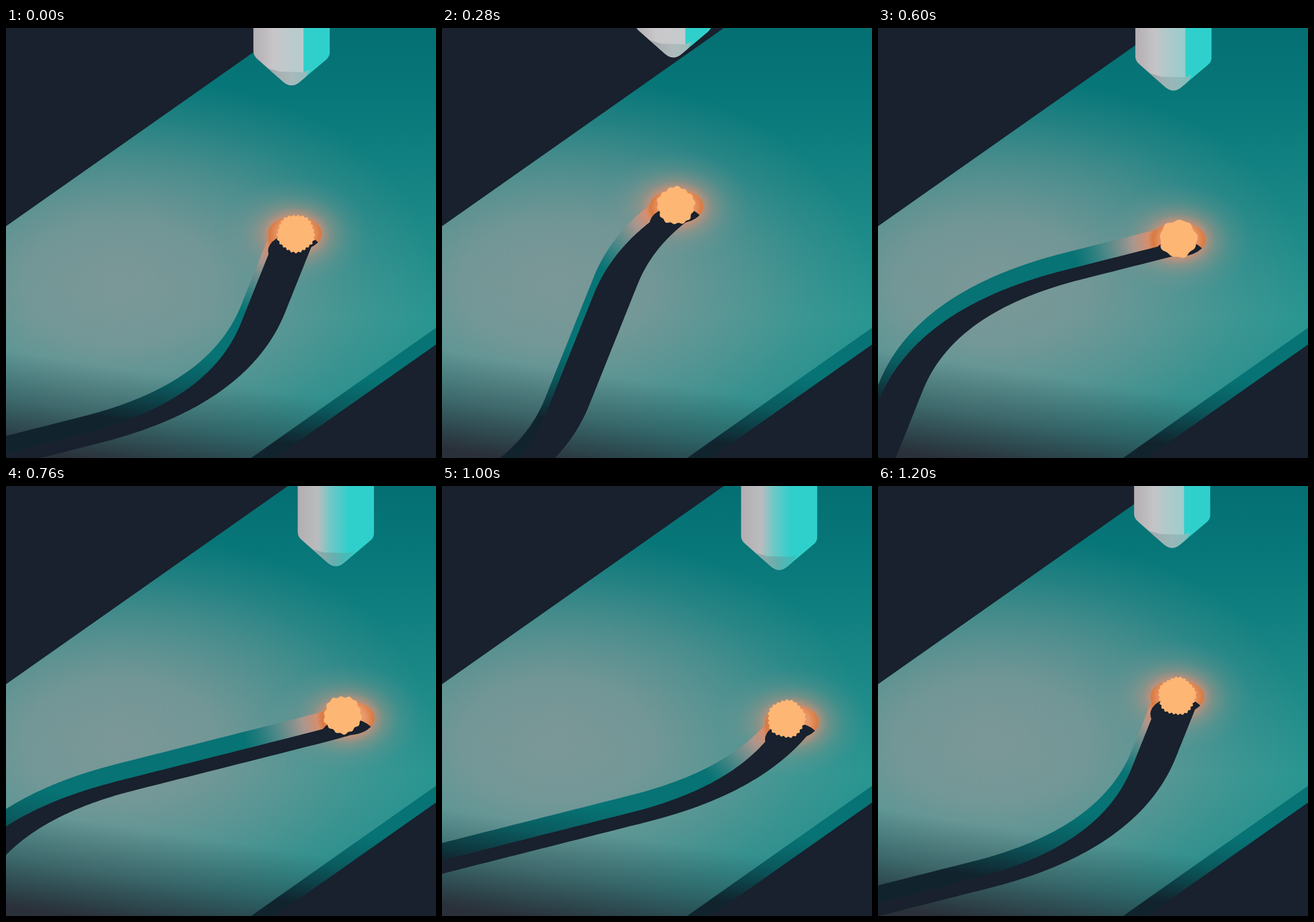
An HTML page with a canvas that plays this animation: 720x720 px, repeating every 1240 ms.

```html
<!DOCTYPE html>
<html lang="en">
<head>
<meta charset="utf-8">
<title>Laser cutter</title>
<style>
  html, body { margin: 0; width: 100%; height: 100%; overflow: hidden; background: #18212d; }
  canvas { display: block; width: 720px; height: 720px; }
</style>
</head>
<body>
<canvas id="stage" width="720" height="720"></canvas>
<script>
const SIZE = 720, LOOP = 1240, STEP = 40, DEPTH = 29, SQUASH = 0.63;
const DARK = '#18212d';
const BELT = { x: -0.789, y: 0.555 };
const ctx = document.getElementById('stage').getContext('2d');
const slotCanvas = document.createElement('canvas');
slotCanvas.width = slotCanvas.height = SIZE;
const slot = slotCanvas.getContext('2d');

// Back-and-forth at constant speed; each turn is a parabola lasting 2 * turn ms
function shuttle(t, center, speed, turn) {
  const half = LOOP / 2;
  const phase = (((t - 277) % LOOP) + LOOP) % LOOP;
  const rise = Math.min(phase, LOOP - phase);
  const fromTurn = Math.min(rise, half - rise);
  const eased = fromTurn < turn ? (turn + fromTurn * fromTurn / turn) / 2 : fromTurn;
  const reach = speed * (half / 2 - eased);
  return center + (rise < half / 2 ? -reach : reach);
}

const cutX = t => shuttle(t, 497, 0.472, 182);
const holeX = t => shuttle(t, 498, 0.43, 130);
const sparkX = t => shuttle(t, 498, 0.38, 60);
const nozzleX = t => shuttle(t, 490, 0.36, 50);
const railY = x => 102.5 + 0.5 * x;

function addStops(gradient, stops) {
  stops.forEach(([at, color]) => gradient.addColorStop(at, color));
  return gradient;
}

function linear(c, x0, y0, x1, y1, stops) {
  return addStops(c.createLinearGradient(x0, y0, x1, y1), stops);
}

function polygon(c, points, fill) {
  c.beginPath();
  points.forEach(([x, y]) => c.lineTo(x, y));
  c.closePath();
  c.fillStyle = fill;
  c.fill();
}

function glow(c, x, y, rx, ry, stops) {
  c.save();
  c.translate(x, y);
  c.scale(rx, ry);
  c.fillStyle = addStops(c.createRadialGradient(0, 0, 0, 0, 0, 1), stops);
  c.fillRect(-1, -1, 2, 2);
  c.restore();
}

const wallShade = c => linear(c, 0, 500, -18, 625,
  [[0, '#077374'], [0.45, '#0a5a5e'], [1, '#11242e']]);

function drawBelt() {
  ctx.fillStyle = DARK;
  ctx.fillRect(0, 0, SIZE, SIZE);
  polygon(ctx, [[720, 500], [408, 720], [450, 720], [720, 530]], wallShade(ctx));

  ctx.save();
  polygon(ctx, [[0, 332], [472, 0], [720, 0], [720, 502], [410, 720], [0, 720]],
    linear(ctx, 0, 0, 0, SIZE, [[0, '#046f72'], [0.17, '#08787a'], [0.67, '#2a9691'], [1, '#238b89']]));
  ctx.clip();
  glow(ctx, 190, 425, 530, 345, [[0, 'rgba(128,152,152,.95)'], [0.3, 'rgba(128,152,152,.85)'],
    [0.6, 'rgba(128,152,152,.48)'], [0.8, 'rgba(128,152,152,.2)'], [1, 'rgba(128,152,152,0)']]);
  ctx.fillStyle = linear(ctx, 100, 555, 76, 715,
    [[0, 'rgba(42,40,50,0)'], [0.5, 'rgba(42,40,50,.4)'], [1, 'rgba(42,40,50,.92)']]);
  ctx.fillRect(0, 0, SIZE, SIZE);
  ctx.restore();
}

// Past cuts carried away by the belt, plus the hole under the beam
function traceSlot(t, hole, color, drop) {
  slot.save();
  slot.translate(0, drop);
  slot.scale(1, SQUASH);
  slot.lineWidth = 76;
  slot.lineCap = slot.lineJoin = 'round';
  slot.strokeStyle = slot.fillStyle = color;
  slot.beginPath();
  for (let age = 0; age <= 1400; age += 10) {
    const x = cutX(t - age);
    slot.lineTo(x + BELT.x * age, (railY(x) + BELT.y * age) / SQUASH);
  }
  slot.stroke();
  slot.beginPath();
  slot.arc(hole.x, hole.y / SQUASH, 45, 0, 2 * Math.PI);
  slot.fill();
  slot.restore();
}

function drawSlot(t, hole) {
  slot.globalCompositeOperation = 'source-over';
  slot.clearRect(0, 0, SIZE, SIZE);
  traceSlot(t, hole, '#000', 0);
  slot.globalCompositeOperation = 'source-atop';
  slot.fillStyle = wallShade(slot);
  slot.fillRect(0, 0, SIZE, SIZE);
  glow(slot, hole.x, hole.y, 180, 150, [[0, '#f0a878'], [0.16, '#e8976a'], [0.24, '#d97a40'],
    [0.29, '#d58f70'], [0.43, 'rgba(176,152,144,.95)'], [0.7, 'rgba(122,150,150,.6)'], [1, 'rgba(80,140,140,0)']]);
  traceSlot(t, hole, DARK, DEPTH);
  ctx.drawImage(slotCanvas, 0, 0);
}

function drawSpark(t) {
  const cx = sparkX(t), cy = railY(cx) - 1;
  const teeth = Math.round(17 + 9 * Math.cos(2 * Math.PI * (t + 100) / LOOP));
  ctx.beginPath();
  for (let i = 0; i < 180; i++) {
    const a = i * Math.PI / 90;
    const r = 31 + 1.2 * Math.sin(teeth * a + t) + Math.sin(5 * a + t / 30);
    ctx.lineTo(cx + r * Math.cos(a), cy + r * Math.sin(a));
  }
  ctx.fillStyle = '#fdb674';
  ctx.fill();
}

function drawNozzle(t) {
  const x = nozzleX(t), y = 97 + 0.515 * (x - 480);
  const lit = Math.max(0, Math.min(1, (x - 470) / 85));
  const tint = (a, b) => `rgb(${a.map((v, i) => Math.round(v + (b[i] - v) * lit))})`;
  ctx.save();
  ctx.translate(x, y);
  ctx.beginPath();
  ctx.moveTo(-64, -200);
  ctx.lineTo(-64, -58);
  ctx.quadraticCurveTo(-64, -49, -56, -43);
  ctx.lineTo(-14, -6);
  ctx.quadraticCurveTo(0, 6, 14, -6);
  ctx.lineTo(58, -43);
  ctx.quadraticCurveTo(64, -48, 64, -56);
  ctx.lineTo(64, -200);
  ctx.clip();
  ctx.fillStyle = linear(ctx, -64, 0, 20, 0, [[0, '#b3aeb2'], [0.4, tint([200, 199, 202], [186, 188, 190])],
    [0.65, tint([200, 201, 204], [110, 200, 198])], [1, tint([196, 203, 205], [50, 206, 203])]]);
  ctx.fillRect(-64, -200, 85, 210);
  ctx.fillStyle = '#2fd0cc';
  ctx.fillRect(20, -200, 44, 210);
  polygon(ctx, [[-64, -50], [-40, -29], [-20, -23], [20, -22], [30, -26], [14, 6], [-14, 6]],
    linear(ctx, -40, 0, 24, 0, [[0, '#a5a7aa'], [0.6, tint([176, 186, 188], [96, 176, 174])],
      [1, tint([160, 188, 188], [60, 190, 187])]]));
  ctx.restore();
}

function draw(now) {
  const t = Math.floor((now % LOOP) / STEP) * STEP;
  const x = holeX(t), hole = { x, y: railY(x) };
  drawBelt();
  glow(ctx, hole.x, hole.y, 125, 92, [[0, 'rgba(245,145,110,.85)'], [0.34, 'rgba(235,145,115,.7)'],
    [0.48, 'rgba(205,148,130,.4)'], [0.7, 'rgba(165,150,142,.17)'], [1, 'rgba(140,150,148,0)']]);
  drawSlot(t, hole);
  drawSpark(t);
  drawNozzle(t);
}

let start;
function tick(now) {
  start ??= now;
  draw(now - start);
  requestAnimationFrame(tick);
}
draw(0);
requestAnimationFrame(tick);
</script>
</body>
</html>
```
